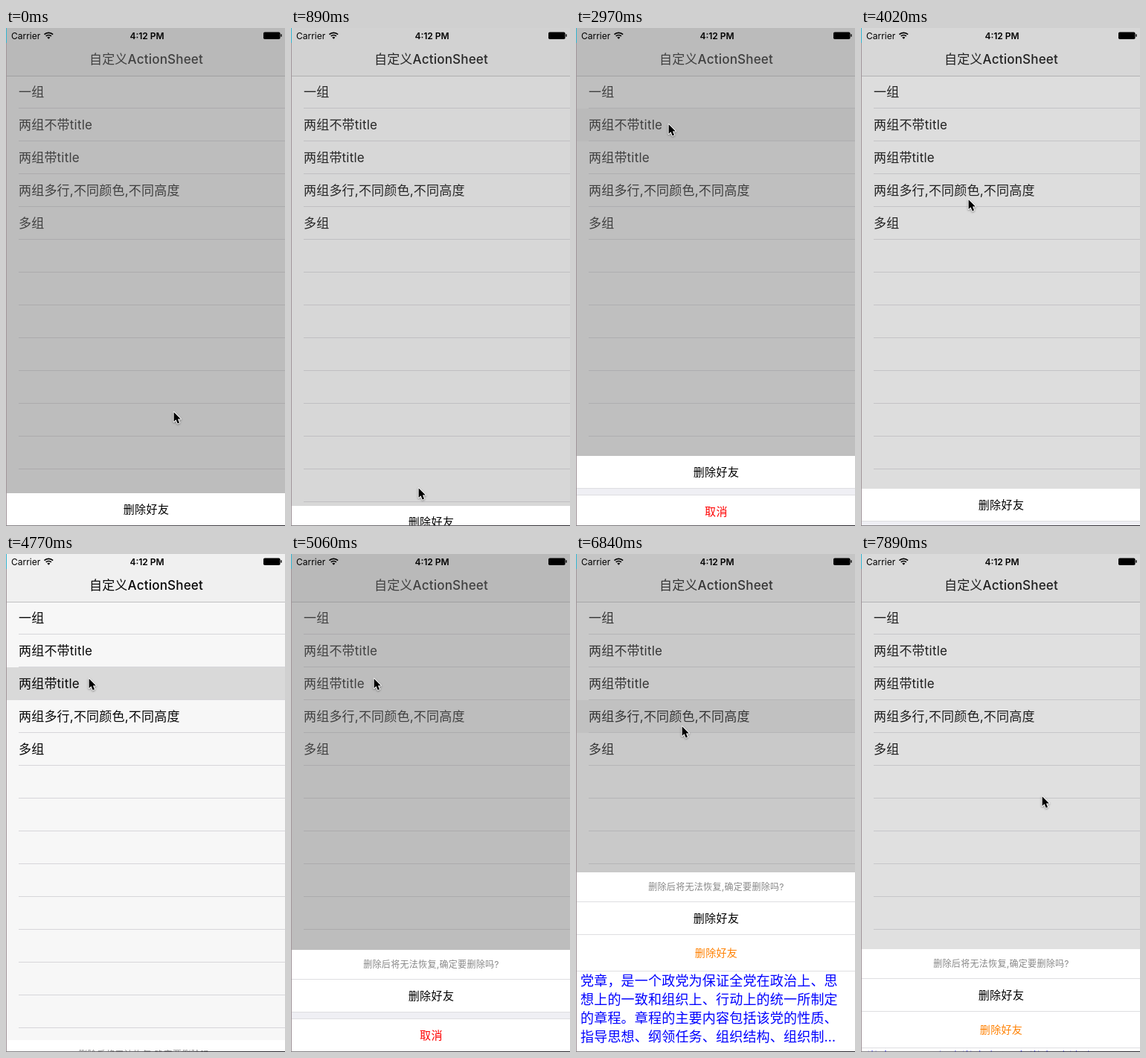
Animation, 375 px wide and 668 px high, one loop 8000 ms. Source, as an HTML page with a canvas:

```html
<!DOCTYPE html>
<html lang="zh-CN">
<head>
<meta charset="utf-8">
<style>
  html, body { margin: 0; width: 100%; height: 100%; overflow: hidden; }
  canvas { display: block; width: 375px; height: 668px; }
</style>
</head>
<body>
<canvas id="stage" width="375" height="668"></canvas>
<script>
const ctx = document.getElementById('stage').getContext('2d');
const W = 375, H = 668, MID = 188.5;
const LOOP = 8000, TICK = 148.87, SLIDE = 300;
const FONT = 'Inter, "Noto Sans CJK SC", "Noto Sans CJK", sans-serif';

const rows = ['一组', '两组不带title', '两组带title', '两组多行,不同颜色,不同高度', '多组'];

// Sheet items
const notice = { h: 40, text: '删除后将无法恢复,确定要删除吗?', size: 12, color: '#888' };
const remove = { h: 44, text: '删除好友', size: 15, color: '#000' };
const warn = { h: 49, text: '删除好友', size: 14, color: '#ff8000' };
const gap = { h: 9, fill: '#efeff4' };
const cancel = { h: 44, text: '取消', size: 15, color: '#f00' };
const essay = {
  h: 109, size: 18, color: '#00f',
  lines: ['党章，是一个政党为保证全党在政治上、思', '想上的一致和组织上、行动上的统一所制定',
    '的章程。章程的主要内容包括该党的性质、', '指导思想、纲领任务、组织结构、组织制…']
};

// Times in ms; row is the list row that opened the sheet
const sheets = [
  { show: -600, hide: 765, row: 0, items: [remove] },
  { show: 2710, hide: 3873, row: 1, items: [remove, gap, cancel] },
  { show: 4700, hide: 5824, row: 2, items: [notice, remove, gap, cancel] },
  { show: 6630, hide: 7734, row: 3, items: [notice, remove, warn, essay, gap, cancel] }
];
const alertBox = { show: 1000, hide: 1785 };

// Pointer path: tick, x, y
const path = [
  [0, 225, 515], [4, 169, 637], [5, 169, 637], [11, 200, 362], [13, 200, 362],
  [17, 124, 129], [22, 124, 129], [25, 143, 289], [26, 143, 289], [27, 144, 230],
  [31, 111, 167], [34, 111, 167], [38, 159, 353], [39, 159, 353], [40, 160, 346],
  [44, 142, 231], [47, 142, 231], [51, 243, 332], [52, 243, 332], [53, 243, 325]
];

const clamp = v => Math.max(0, Math.min(1, v));
const ease = v => { v = clamp(v); return v * v * (3 - 2 * v); };

function rect(x, y, w, h, color) {
  ctx.fillStyle = color;
  ctx.fillRect(x, y, w, h);
}

function label(text, x, y, size, { color = '#000', weight = 400, align = 'center', spacing = 0.2 } = {}) {
  ctx.font = `${weight} ${size}px ${FONT}`;
  ctx.letterSpacing = spacing + 'px';
  ctx.textAlign = align;
  ctx.fillStyle = color;
  ctx.fillText(text, x, y + size * 0.37);
}

function drawList(time) {
  rect(0, 0, W, H, '#fff');
  rect(0, 0, W, 64, '#f7f7f7');
  rect(0, 64, W, 1, '#c4c4c6');
  label('自定义ActionSheet', MID, 42, 17, { weight: 500 });
  for (const s of sheets) {
    if (time < s.show) continue;
    ctx.globalAlpha = 1 - clamp((time - s.show) / 360);
    rect(0, 64 + s.row * 44, W, 44, '#d9d9d9');
    ctx.globalAlpha = 1;
  }
  for (let y = 107; y < H; y += 44) rect(17, y, W - 17, 1, '#dddce0');
  rows.forEach((text, i) => label(text, 17, 86 + i * 44, 17, { align: 'left' }));
}

function drawSheet(sheet, time) {
  const open = ease((time - sheet.show) / SLIDE) - ease((time - sheet.hide) / SLIDE);
  if (open <= 0) return;
  rect(0, 0, W, H, `rgba(126,126,126,${0.51 * open})`);
  const height = sheet.items.reduce((sum, item) => sum + item.h, 0);
  let y = Math.round(H - height * open);
  sheet.items.forEach((item, i) => {
    rect(0, y, W, item.h, item.fill || '#fff');
    if (i) rect(0, y - 1, W, 1, '#dedee1');
    if (item.text) {
      label(item.text, MID, y + item.h / 2 - 0.7, item.size, { color: item.color, spacing: item.size * 0.026 });
    }
    (item.lines || []).forEach((line, n) =>
      label(line, 6, y + 12 + n * 25, item.size, { color: item.color, align: 'left' }));
    y += item.h;
  });
}

function drawAlert(time) {
  const alpha = clamp((time - alertBox.show) / 250) - ease((time - alertBox.hide) / 210);
  if (alpha <= 0) return;
  ctx.globalAlpha = alpha;
  rect(0, 0, W, H, 'rgba(0,0,0,0.4)');
  ctx.fillStyle = '#f8f8f8';
  ctx.beginPath();
  ctx.roundRect(53.5, 282, 270, 104, 13);
  ctx.fill();
  rect(53.5, 342, 270, 1, '#d0d0d3');
  label('点击了删除好友', MID, 312, 17, { weight: 500 });
  label('好', MID, 364, 17, { color: '#007aff' });
  ctx.globalAlpha = 1;
}

function drawStatus() {
  label('Carrier', 7, 10.5, 12, { align: 'left', spacing: 0 });
  label('4:12 PM', 189.5, 10.5, 12, { weight: 600, spacing: 0 });
  ctx.strokeStyle = ctx.fillStyle = '#000';
  ctx.lineWidth = 1.7;
  for (const r of [5, 8.2]) {
    ctx.beginPath();
    ctx.arc(57.3, 14.5, r, -Math.PI * 0.75, -Math.PI * 0.25);
    ctx.stroke();
  }
  ctx.beginPath();
  ctx.moveTo(57.3, 14.8);
  ctx.arc(57.3, 14.8, 2.8, -Math.PI * 0.75, -Math.PI * 0.25);
  ctx.fill();
  ctx.beginPath();
  ctx.roundRect(346, 5.5, 22.5, 9.5, 1.8);
  ctx.fill();
  rect(369.2, 8.3, 1.4, 3.4, '#000');
}

// Slivers of the desktop along the left and bottom edges
function drawEdges() {
  rect(0, 0, 1, H, '#a2969b');
  rect(0, 0, 1, 20, '#35b6d2');
  const shade = ctx.createLinearGradient(0, 0, W, 0);
  shade.addColorStop(0, '#8a878a');
  shade.addColorStop(1, '#2c2a30');
  rect(0, H - 1, W, 1, shade);
}

function pointerAt(tick) {
  const next = path.findIndex(p => p[0] > tick);
  if (next < 0) return path[path.length - 1].slice(1);
  const [t0, x0, y0] = path[next - 1], [t1, x1, y1] = path[next];
  const k = ease((tick - t0) / (t1 - t0));
  return [x0 + (x1 - x0) * k, y0 + (y1 - y0) * k];
}

function drawPointer(tick) {
  const [x, y] = pointerAt(tick);
  const arrow = new Path2D('M.6 .2V13L3.5 10.3L5.6 15.4L8 14.4L5.9 9.5H9.8Z');
  ctx.save();
  ctx.translate(Math.round(x), Math.round(y));
  ctx.lineJoin = 'round';
  ctx.lineWidth = 2;
  ctx.strokeStyle = '#fff';
  ctx.shadowColor = 'rgba(0,0,0,0.4)';
  ctx.shadowBlur = 2.5;
  ctx.shadowOffsetY = 1;
  ctx.stroke(arrow);
  ctx.shadowColor = 'transparent';
  ctx.fillStyle = '#000';
  ctx.fill(arrow);
  ctx.restore();
}

function draw(now) {
  // The screen refreshes in even ticks
  const tick = Math.floor((now % LOOP + 9) / TICK);
  const time = tick * TICK;
  drawList(time);
  for (const sheet of sheets) drawSheet(sheet, time);
  drawAlert(time);
  drawStatus();
  drawEdges();
  drawPointer(tick);
}

const start = performance.now();
function loop() {
  draw(performance.now() - start);
  requestAnimationFrame(loop);
}
loop();
</script>
</body>
</html>
```
